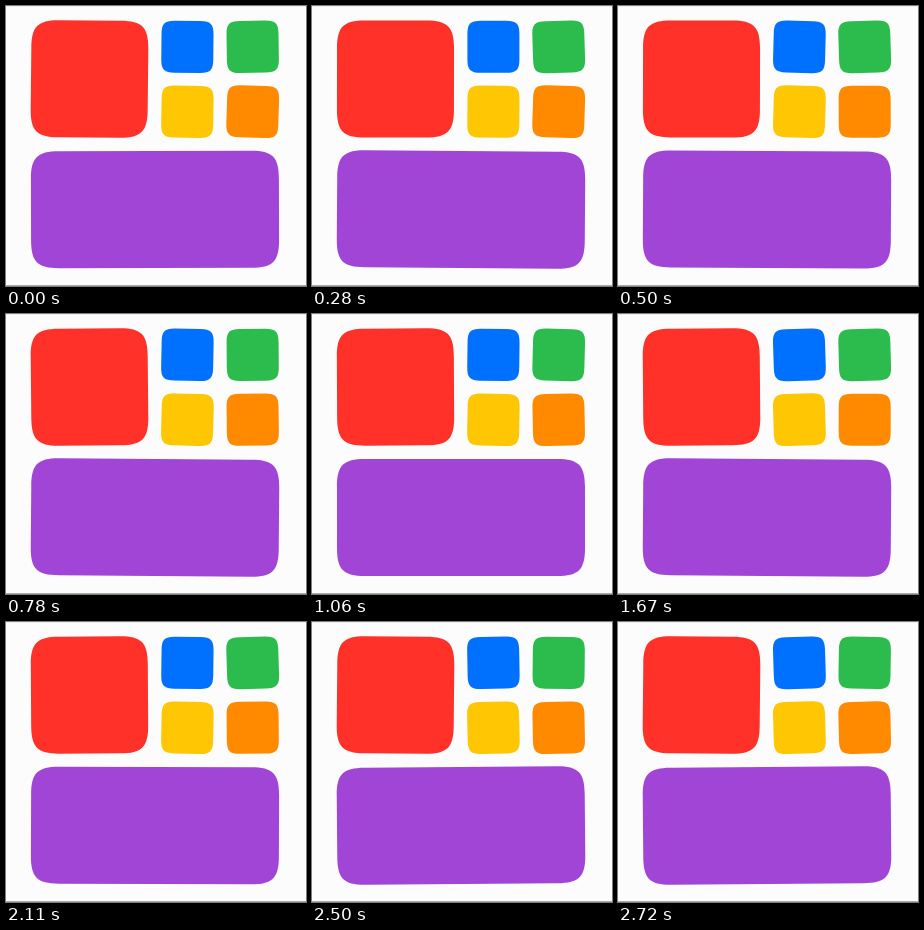
Animation of 300x280 px, one loop 2.78 s. Source, as an HTML page:

```html
<!DOCTYPE html>
<html lang="en">
<head>
<meta charset="utf-8">
<title>Jiggling tiles</title>
<style>
  html, body { margin: 0; width: 100%; height: 100%; overflow: hidden; background: #fcfcfc; }
  svg { display: block; width: 300px; height: 280px; }
</style>
</head>
<body>
<svg id="stage" viewBox="0 0 300 280">
  <rect width="300" height="280" fill="#fcfcfc"/>
  <rect width="300" height="1" fill="#eeeeee"/>
  <rect y="279" width="300" height="1" fill="#a8a8a8"/>
</svg>
<script>
  const LOOP = 2780, FPS = 18;
  const stage = document.getElementById('stage');

  // amp in degrees, freq in turns per step, peak is a step where the tilt is largest
  const tiles = [
    { x: 83.5, y: 73, w: 117, h: 117, r: 20, fill: '#ff3129', amp: 0.6, freq: 0.246, peak: 0 },
    { x: 181.4, y: 40.8, w: 52, h: 52, r: 9.5, fill: '#0070ff', amp: -1.8, freq: 0.21, peak: 30 },
    { x: 246.7, y: 40.8, w: 52, h: 52, r: 9.5, fill: '#2cbc4d', amp: -1.8, freq: 0.2414, peak: 9 },
    { x: 181.4, y: 105.7, w: 52, h: 52, r: 9.5, fill: '#fec603', amp: -1.8, freq: 0.21, peak: 30.2 },
    { x: 246.7, y: 105.7, w: 52, h: 52, r: 9.5, fill: '#ff8a00', amp: 1.8, freq: 0.192, peak: 0 },
    { x: 149, y: 203.5, w: 248, h: 117, r: 20, fill: '#a145d6', amp: -0.5, freq: 0.24, peak: 45 }
  ];

  // Rounded box around the origin with smooth, continuous corners
  function softBox(w, h, r) {
    const a = w / 2, b = h / 2, e = r * 1.4, c = e * 0.225;
    return `M${e - a} ${-b}H${a - e}C${a - c} ${-b} ${a} ${c - b} ${a} ${e - b}` +
      `V${b - e}C${a} ${b - c} ${a - c} ${b} ${a - e} ${b}` +
      `H${e - a}C${c - a} ${b} ${-a} ${b - c} ${-a} ${b - e}` +
      `V${e - b}C${-a} ${c - b} ${c - a} ${-b} ${e - a} ${-b}Z`;
  }

  for (const t of tiles) {
    t.el = document.createElementNS(stage.namespaceURI, 'path');
    t.el.setAttribute('d', softBox(t.w, t.h, t.r));
    t.el.setAttribute('fill', t.fill);
    stage.append(t.el);
  }

  function draw(ms) {
    // Steps change on the nearest hundredth of a second
    const hundredths = Math.floor((ms % LOOP) / 10);
    const step = Math.ceil((hundredths + 0.5) * FPS / 100) - 1;
    for (const t of tiles) {
      const angle = t.amp * Math.cos(2 * Math.PI * t.freq * (step - t.peak));
      t.el.setAttribute('transform', `translate(${t.x} ${t.y}) rotate(${angle.toFixed(3)})`);
    }
  }

  const start = performance.now();
  function tick() {
    draw(performance.now() - start);
    requestAnimationFrame(tick);
  }
  tick();
</script>
</body>
</html>
```
